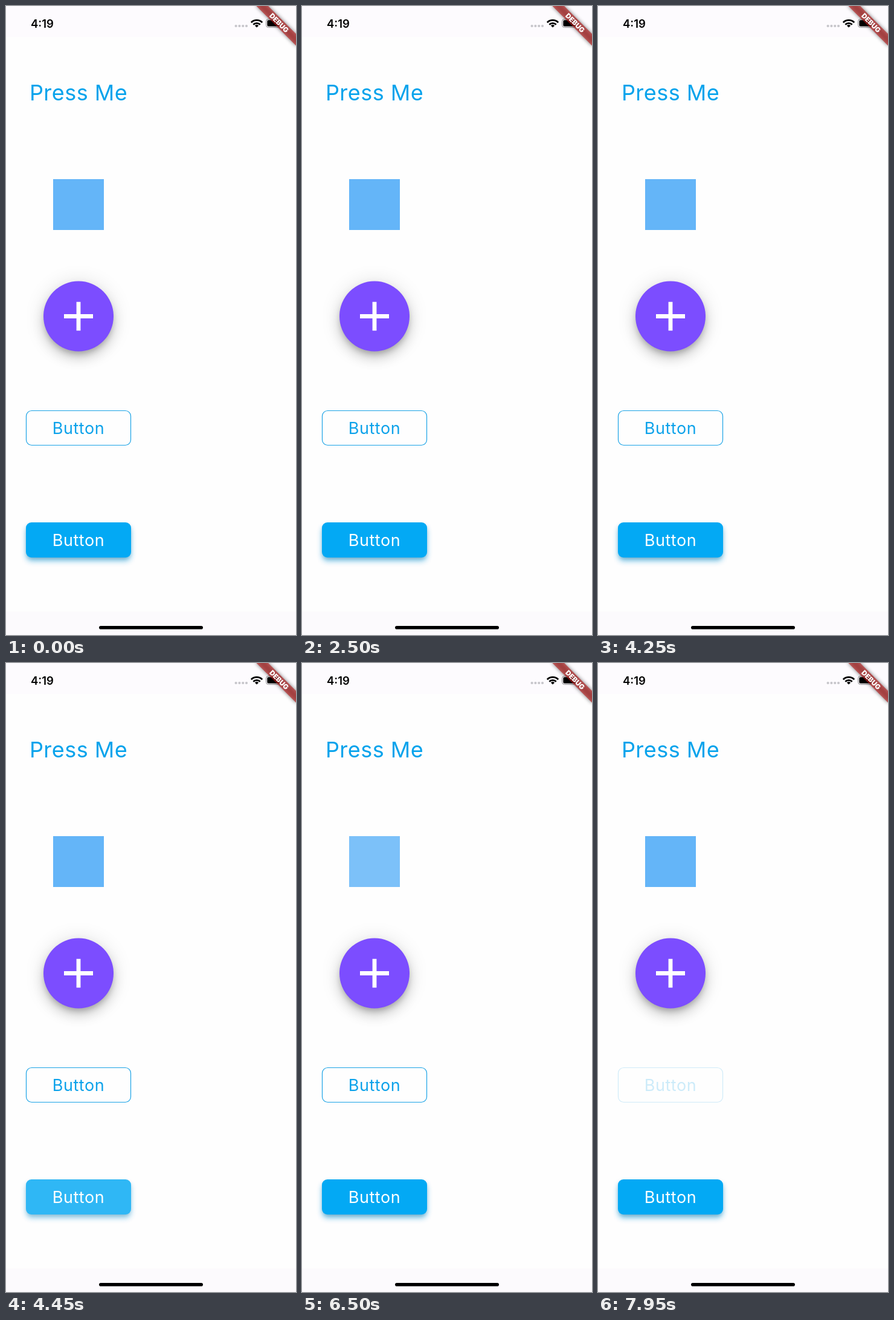
Animation, 480 px wide and 1039 px high, one loop 8000 ms. Source, as an HTML page:

```html
<!DOCTYPE html>
<html lang="en">
<head>
<meta charset="utf-8">
<title>Press Me</title>
<style>
  html, body { margin: 0; width: 100%; height: 100%; overflow: hidden; background: #fefefe; }
  svg { display: block; width: 100vw; height: 100vh; }
  text { font-family: Inter, "Open Sans", sans-serif; font-optical-sizing: none; text-anchor: middle; }
  .label { font-size: 27px; letter-spacing: .55px; }
</style>
</head>
<body>
<svg viewBox="0 0 480 1039">
  <defs>
    <filter id="blur3" x="-50%" y="-100%" width="200%" height="300%"><feGaussianBlur stdDeviation="3"/></filter>
    <filter id="blur5" x="-50%" y="-50%" width="200%" height="200%"><feGaussianBlur stdDeviation="5"/></filter>
    <filter id="blur10" x="-50%" y="-50%" width="200%" height="200%"><feGaussianBlur stdDeviation="10"/></filter>
    <filter id="blur17" x="-60%" y="-60%" width="220%" height="220%"><feGaussianBlur stdDeviation="17"/></filter>
  </defs>

  <rect width="480" height="1039" fill="#fefefe"/>
  <rect width="480" height="51" fill="#fdfbfe"/>
  <rect y="1000" width="480" height="39" fill="#fcfafd"/>

  <!-- status bar -->
  <text x="60" y="35.5" font-size="18.5" font-weight="600">4:19</text>
  <g fill="#c6c5ca">
    <circle cx="380.6" cy="33" r="2.1"/><circle cx="386.4" cy="33" r="2.1"/>
    <circle cx="392.2" cy="33" r="2.1"/><circle cx="398" cy="33" r="2.1"/>
  </g>
  <g fill="none" stroke="#000" stroke-width="2.7">
    <path d="M405.8 27.2a13 13 0 0 1 18.4 0"/>
    <path d="M409.3 30.8a8 8 0 0 1 11.4 0"/>
  </g>
  <path d="M415 35.6l-3.1-3.2a4.5 4.5 0 0 1 6.2 0z"/>
  <rect x="430.5" y="21.5" width="25" height="14" rx="4" fill="none" stroke="#8a898c"/>
  <rect x="432.3" y="23.3" width="21.4" height="10.4" rx="2.5"/>

  <!-- corner ribbon -->
  <g transform="translate(480 0) rotate(45)">
    <rect x="-47" y="32.5" width="94" height="13.9" opacity=".5" filter="url(#blur3)"/>
    <rect x="-47" y="32.5" width="94" height="13.9" fill="#b71c1c" fill-opacity=".627"/>
    <text y="43.6" font-size="11.4" font-weight="900" fill="#fff">DEBUG</text>
  </g>

  <g id="title">
    <text x="120" y="156.3" font-size="36" letter-spacing=".45" fill="#06a3ec">Press Me</text>
  </g>

  <g id="tile"><rect x="78" y="286" width="84" height="84" fill="#64b5f8"/></g>

  <g id="plus">
    <circle cx="120" cy="515" r="58" opacity=".12" filter="url(#blur17)"/>
    <circle cx="120" cy="524" r="58" opacity=".14" filter="url(#blur10)"/>
    <circle cx="120" cy="519" r="56" opacity=".2" filter="url(#blur5)"/>
    <circle cx="120" cy="512.5" r="58" fill="#7c4dff"/>
    <path d="M96 512.5h48M120 488.7v47.6" stroke="#fff" stroke-width="6.8"/>
  </g>

  <g id="outline">
    <rect x="33.5" y="668.5" width="173" height="57" rx="9" fill="none" stroke="#1ba3e6" stroke-width="1.2"/>
    <text class="label" x="120" y="706.8" fill="#0ca2ea">Button</text>
  </g>

  <g id="solid">
    <rect x="33" y="859" width="174" height="58" rx="9" fill="#0393d6" opacity=".48" filter="url(#blur5)"/>
    <rect x="35" y="857" width="170" height="56" rx="9" fill="#123" opacity=".2" filter="url(#blur3)"/>
    <rect x="33" y="853" width="174" height="58" rx="9" fill="#03a9f4"/>
    <text class="label" x="120" y="891.8" fill="#fff">Button</text>
  </g>

  <rect x="154" y="1024" width="172" height="5.6" rx="2.8"/>
</svg>
<script>
  const LOOP = 8000, STEP = 50, FADE = 100, DIM = 0.2;

  // id, first step, number of steps, dimmest moment, time spent dim
  const presses = [
    ["title", 500, 5, 600, 0],
    ["tile", 1600, 5, 1700, 0],
    ["plus", 2500, 6, 2625, 40],
    ["outline", 3450, 5, 3528, 0],
    ["solid", 4250, 5, 4362, 20],
    ["title", 5550, 4, 5600, 0],
    ["tile", 6300, 5, 6410, 20],
    ["plus", 7000, 6, 7125, 40],
    ["outline", 7850, 3, 7950, 0]
  ];
  const parts = {};
  for (const [id] of presses) parts[id] = document.getElementById(id);

  function fade(t, low, hold) {
    const away = Math.max(0, Math.abs(t - low) - hold / 2);
    return Math.min(1, DIM + (1 - DIM) * away / FADE);
  }

  // A press keeps its last step until the next press begins.
  function draw(time) {
    const t = Math.floor((time % LOOP) / STEP) * STEP;
    for (const id in parts) parts[id].setAttribute("opacity", 1);
    const press = presses.filter(p => p[1] <= t).pop();
    if (!press) return;
    const [id, start, steps, low, hold] = press;
    const held = Math.min(t, start + (steps - 1) * STEP);
    parts[id].setAttribute("opacity", fade(held, low, hold));
  }

  let origin;
  function tick(now) {
    origin ??= now;
    draw(now - origin);
    requestAnimationFrame(tick);
  }
  draw(0);
  requestAnimationFrame(tick);
</script>
</body>
</html>
```
